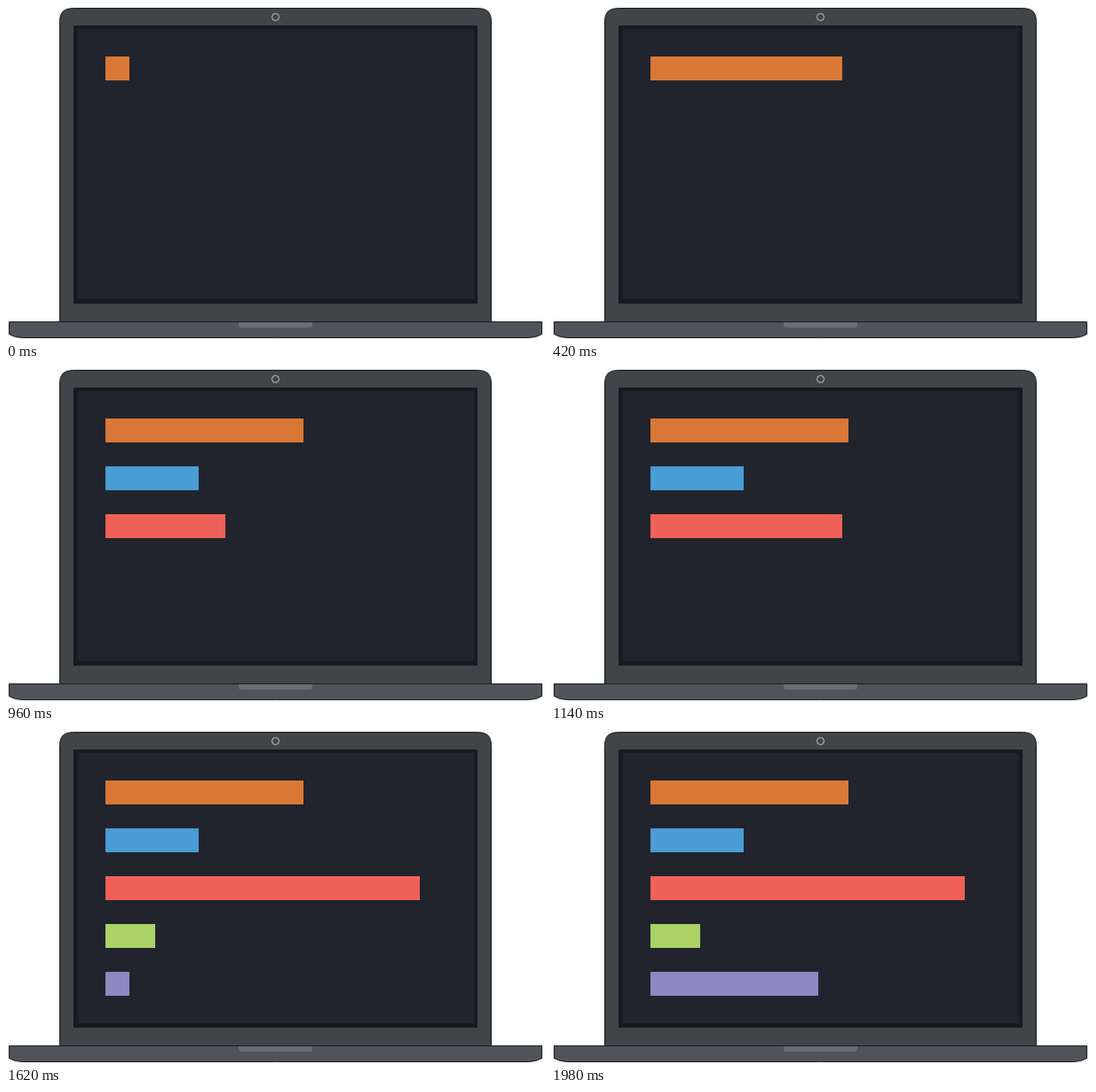
These frames come from a looping animation (607x377 px, 4200 ms). An HTML page with a canvas:

```html
<!DOCTYPE html>
<html lang="en">
<head>
<meta charset="utf-8">
<title>Laptop bars</title>
<style>
html, body { margin: 0; width: 100%; height: 100%; overflow: hidden; background: #fff; }
canvas { display: block; }
</style>
</head>
<body>
<canvas id="stage" width="607" height="377"></canvas>
<script>
const ctx = document.getElementById('stage').getContext('2d');
const LOOP = 4200, TICK = 60, BLOCK = 27, LEFT = 112, TOP = 57;

const bars = [
  { width: 223, color: '#d97836' },
  { width: 105, color: '#4a9cd5' },
  { width: 354, color: '#ef6058' },
  { width: 56, color: '#aad267' },
  { width: 189, color: '#8a89c2' }
];

// Each bar takes a whole number of ticks; the next one starts right after it.
let next = 0;
for (const bar of bars) {
  bar.start = next;
  bar.ticks = Math.round(bar.width / BLOCK);
  next += bar.ticks;
}

function box(x, y, w, h, color) {
  ctx.fillStyle = color;
  ctx.fillRect(x, y, w, h);
}

function shape(path, fill, stroke) {
  if (fill) {
    ctx.fillStyle = fill;
    ctx.fill(path);
  }
  if (stroke) {
    ctx.strokeStyle = stroke;
    ctx.lineWidth = 1;
    ctx.stroke(path);
  }
}

const lid = new Path2D('M60.5 356.5V16.5Q60.5 2.5 75.5 2.5H531.5Q546.5 2.5 546.5 16.5V356.5Z');
const base = new Path2D('M3.5 356.5H603.5V370.5Q597 374.5 588 374.5H19Q10 374.5 3.5 370.5Z');
const notch = new Path2D('M262 357H345V360Q345 363 342 363H265Q262 363 262 360Z');
const camera = new Path2D();
camera.arc(303.5, 12.5, 4, 0, Math.PI * 2);

function drawLaptop() {
  box(0, 0, 607, 377, '#fff');
  shape(lid, '#414547', '#1b1f24');
  box(76, 22, 455, 314, '#171a20');
  box(81, 26, 446, 305, '#21242c');
  shape(camera, null, '#c3c5c6');
  shape(base, '#505359', '#1b1f24');
  shape(notch, '#6b6d72');
}

function barWidth(bar, tick) {
  const age = tick - bar.start;
  if (age < 0) return 0;
  return age >= bar.ticks ? bar.width : Math.min(bar.width, (age + 1) * BLOCK);
}

function draw(time) {
  const tick = Math.floor((time % LOOP) / TICK);
  drawLaptop();
  bars.forEach((bar, row) => {
    box(LEFT, TOP + row * 2 * BLOCK, barWidth(bar, tick), BLOCK, bar.color);
  });
}

let origin = null;
function frame(now) {
  if (origin === null) origin = now;
  draw(Math.max(0, now - origin));
  requestAnimationFrame(frame);
}
draw(0);
requestAnimationFrame(frame);
</script>
</body>
</html>
```
